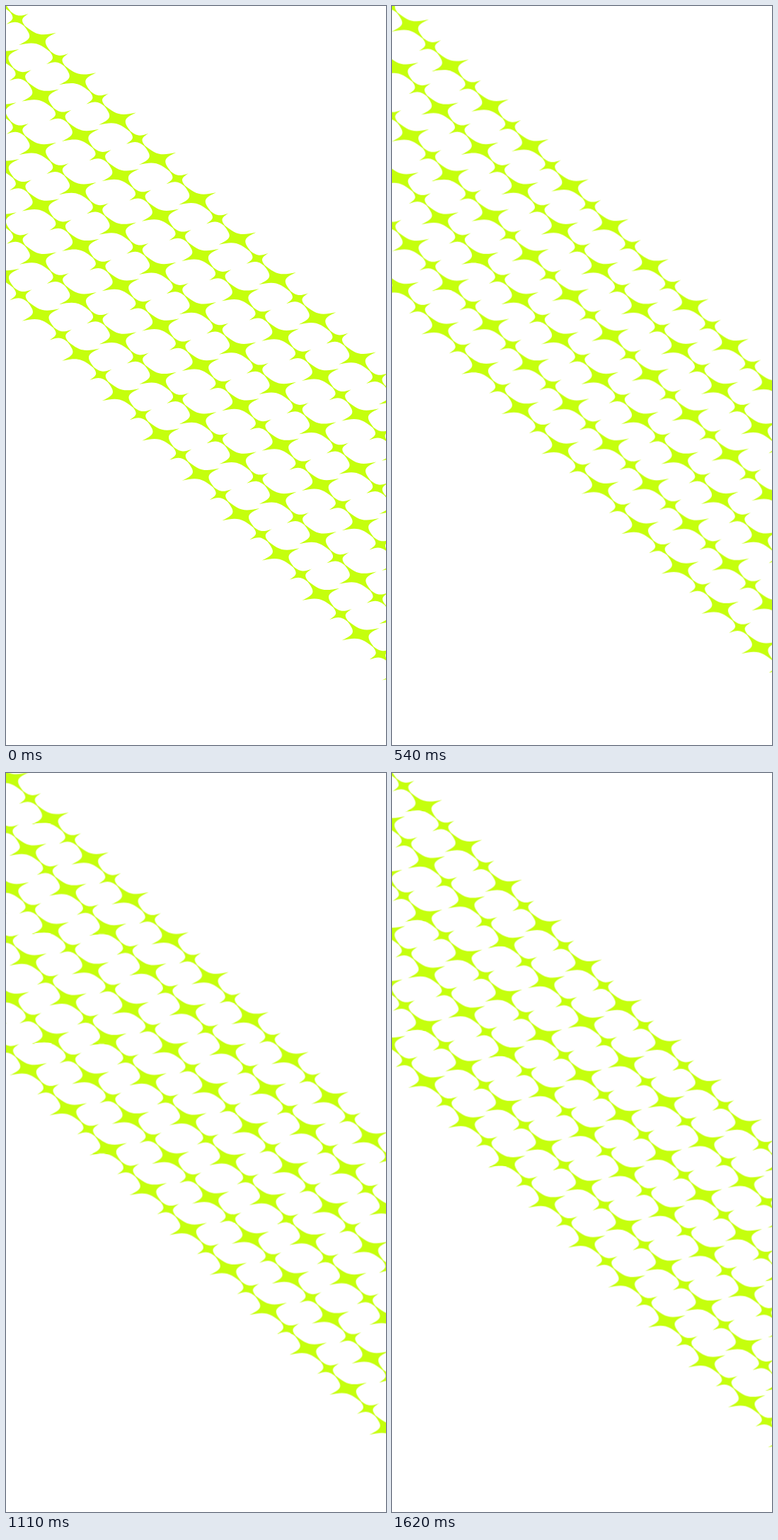
These frames come from a looping animation (537 px wide and 1043 px high, 1650 ms). An HTML page:

```html
<!DOCTYPE html>
<html lang="en">
<head>
<meta charset="utf-8">
<title>Star lattice</title>
<style>
  html, body { margin: 0; width: 100%; height: 100%; overflow: hidden; background: #fff; }
  svg { display: block; width: 100%; height: 100%; fill: #c5ff0d; }
  .row { animation: drift 1650ms steps(55, jump-none) infinite; }
  .up { --dx: -56.5px; --dy: -56.35px; }
  .down { --dx: 56.5px; --dy: 56.35px; }
  @keyframes drift {
    from { transform: translate(0, 0); }
    to { transform: translate(var(--dx), var(--dy)); }
  }
</style>
</head>
<body>
<svg id="stage" viewBox="0 0 537 1043"></svg>
<script>
  const PITCH = [56.5, 56.35];
  const PULL = 0.2;   // how far the edges follow each arm
  const WEDGE = 0.09; // how much the arms widen from their tips
  const BIG = { arm: [26.4, -8.6], spine: [22, 22] };
  const SMALL = { arm: [15.6, -7.5], spine: [13.5, 13.5] };

  // Four-pointed star with concave edges, drawn on two skewed axes.
  function star(cx, cy, { arm, spine }) {
    const tips = [arm, spine, arm.map(n => -n), spine.map(n => -n)];
    const mix = (a, b, k, w) =>
      `${(cx + a[0] * k + b[0] * w).toFixed(2)} ${(cy + a[1] * k + b[1] * w).toFixed(2)}`;
    const edges = tips.map((tip, i) => {
      const next = tips[(i + 1) % 4];
      return `C${mix(tip, next, PULL, WEDGE)} ${mix(next, tip, PULL, WEDGE)} ${mix(next, tip, 1, 0)}`;
    });
    return `M${mix(arm, spine, 1, 0)}${edges.join('')}Z`;
  }

  function chain(x, y) {
    let d = '';
    for (let i = -3; i < 12; i++) {
      const cx = x + i * PITCH[0], cy = y + i * PITCH[1];
      d += star(cx, cy, BIG) + star(cx + PITCH[0] / 2, cy + PITCH[1] / 2, SMALL);
    }
    return d;
  }

  let rows = '';
  for (let pair = 0; pair < 3; pair++) {
    const x = pair * 0.3, y = pair * 154.9;
    rows += `<path class="row up" d="${chain(44.5 + x, 46.4 + y)}"/>`;
    rows += `<path class="row down" d="${chain(48.6 + x, 126 + y)}"/>`;
  }
  document.getElementById('stage').innerHTML = rows;
</script>
</body>
</html>
```
